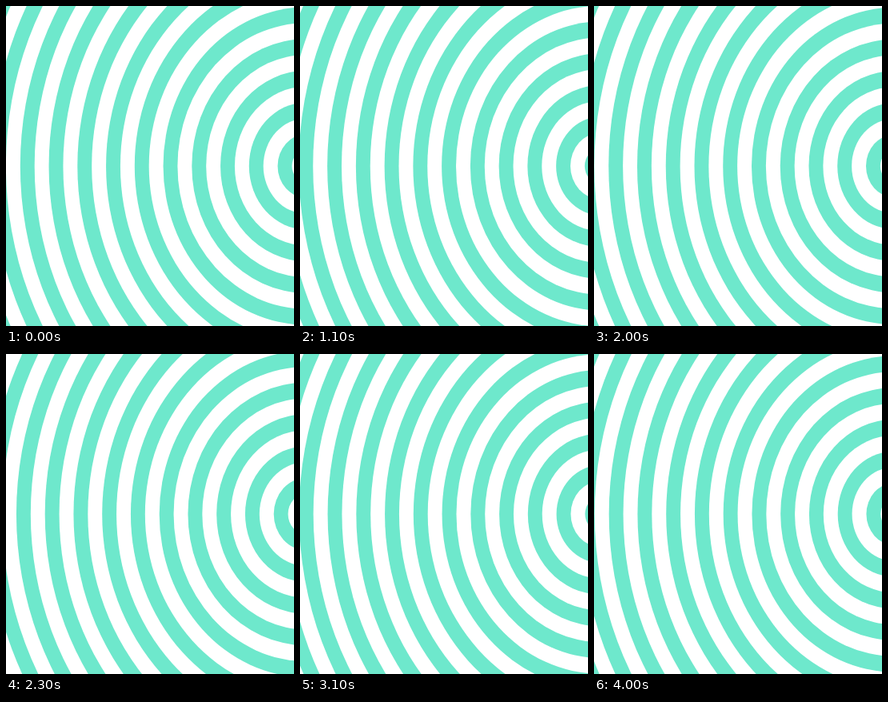
Animation, 360 px wide and 400 px high, one loop 4.05 s. Source, as an HTML page:

```html
<!DOCTYPE html>
<html lang="en">
<head>
<meta charset="utf-8">
<title>Expanding rings</title>
<style>
  html, body { margin: 0; width: 100%; height: 100%; overflow: hidden; background: #fff; }
  svg { display: block; width: 100%; height: 100%; }
</style>
</head>
<body>
<svg viewBox="0 0 360 400" preserveAspectRatio="none">
  <rect width="360" height="400" fill="#fff"/>
  <g id="rings" transform="translate(375.3 200) scale(1 1.1111)"></g>
</svg>
<script>
  const LOOP = 4050;
  const STEP = 50;
  const CYCLES = 2;        // ring spacings travelled per loop
  const SPACING = 35.75;
  const OUTERMOST = 26;    // in half spacings from the centre
  const GREEN = "#6ee8cc";
  const WHITE = "#fff";

  const group = document.getElementById("rings");
  const discs = [];

  // Nested discs, largest first: even ones are green, odd ones white.
  // Index -1 is the white gap that opens inside the newest green disc.
  for (let index = OUTERMOST; index >= -1; index--) {
    const disc = document.createElementNS("http://www.w3.org/2000/svg", "circle");
    disc.setAttribute("fill", index % 2 === 0 ? GREEN : WHITE);
    group.append(disc);
    discs.push({ disc, offset: index / 2 });
  }

  function render(time) {
    const t = Math.floor((time % LOOP) / STEP) * STEP;
    const phase = (t / LOOP * CYCLES) % 1;
    for (const { disc, offset } of discs) {
      disc.setAttribute("r", Math.max(0, (offset + phase) * SPACING).toFixed(3));
    }
  }

  const start = performance.now();
  function tick() {
    render(performance.now() - start);
    requestAnimationFrame(tick);
  }
  tick();
</script>
</body>
</html>
```
